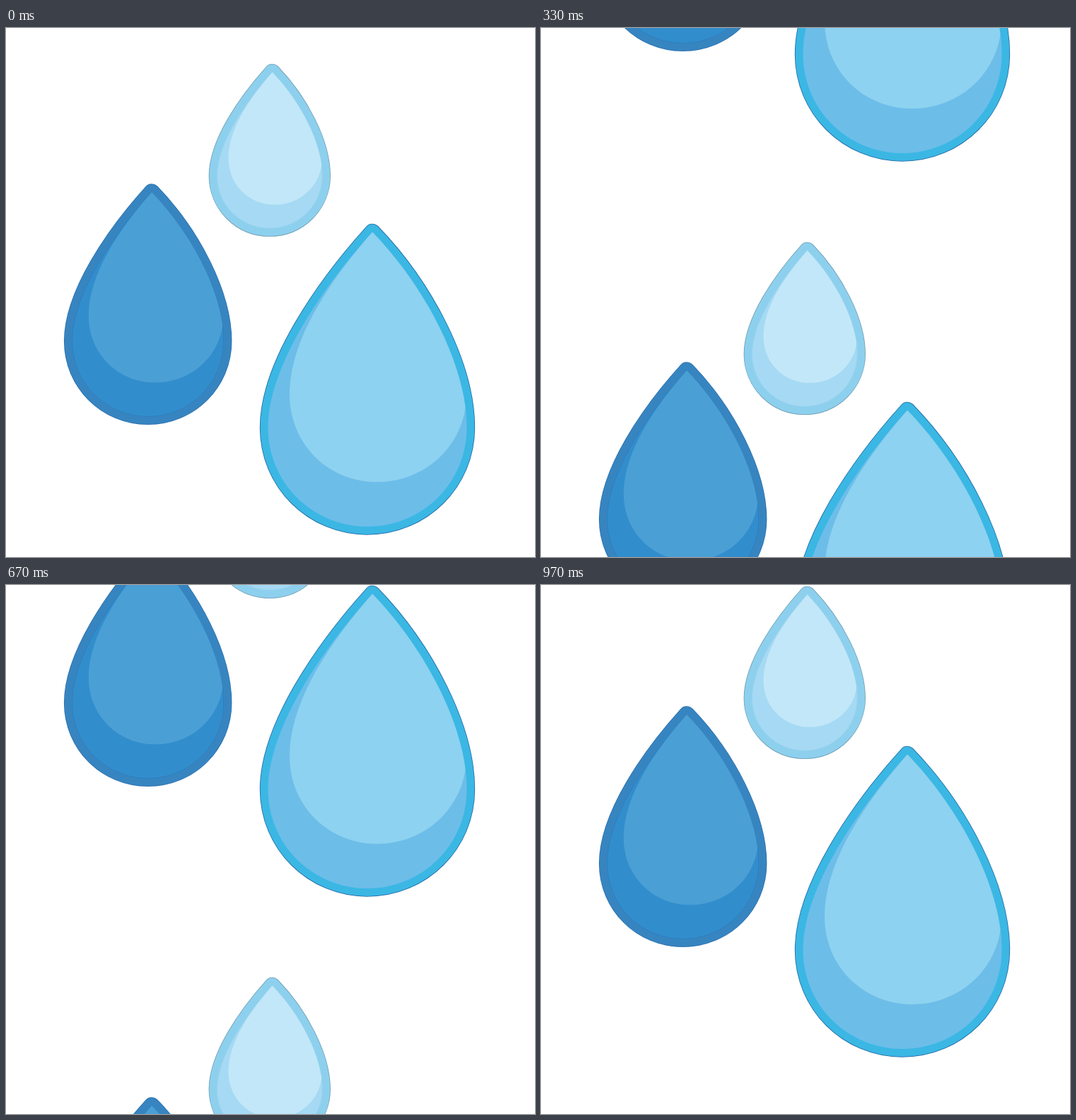
These frames come from a looping animation (748 by 748 pixels, 1010 ms). An HTML page:

```html
<!DOCTYPE html>
<html lang="en">
<head>
<meta charset="utf-8">
<title>Falling drops</title>
<style>
  html, body { margin: 0; height: 100%; overflow: hidden; background: #fff; }
  svg { display: block; width: 100%; height: 100%; }
  path { vector-effect: non-scaling-stroke; stroke-linejoin: round; }
  .edge { fill: none; stroke: var(--edge); stroke-width: 23.4px; }
  .rim { fill: none; stroke: var(--rim); stroke-width: 21.8px; }
  .body { fill: var(--body); stroke: var(--seam); stroke-width: 1px; }
  .shine { fill: var(--shine); }
  .pale { --edge: #6f9db3; --rim: #8dd0ee; --body: #a6d9f3; --seam: #98d2ee; --shine: #c2e7f8; }
  .deep { --edge: #2a6fae; --rim: #3785c0; --body: #328dcc; --seam: #2f7fbd; --shine: #4a9fd5; }
  .clear { --edge: #2068a4; --rim: #3bb7e4; --body: #6dbde9; --seam: none; --shine: #8dd2f0; }
</style>
</head>
<body>
<svg viewBox="0 0 748 748">
  <defs>
    <path id="outline" d="M0 0C75 77.5 133.5 189.5 133.5 276.5C133.5 354.2 71 416.5 -7 416.5C-85 416.5 -147.5 354.2 -147.5 276.5C-147.5 189.5 -70 77.5 0 0Z"/>
    <clipPath id="inside"><use href="#outline"/></clipPath>
    <g id="drop">
      <use href="#outline" class="edge"/>
      <use href="#outline" class="rim"/>
      <use href="#outline" class="body"/>
      <path class="shine" clip-path="url(#inside)" d="M0 0C-66 75.5 -117 156.5 -117 229.5C-117 299.5 -62.5 353.5 7 353.5C76.5 353.5 133 299.5 133 229.5L140 0Z"/>
    </g>
    <g id="trio">
      <use href="#drop" class="pale" transform="translate(376.5 62.5) scale(.53)"/>
      <use href="#drop" class="deep" transform="translate(206 232) scale(.762)"/>
      <use href="#drop" class="clear" transform="translate(518 288.5)"/>
    </g>
  </defs>
  <g id="rain">
    <use href="#trio"/>
    <use href="#trio" y="-780"/>
  </g>
</svg>
<script>
  const LOOP = 1010, STEP = 25.2, LAST = 29;
  const rain = document.getElementById('rain');

  // 30 steps per second, with each change rounded to 10 ms
  function stepAt(ms) {
    const tick = Math.floor((ms % LOOP) / 10);
    return Math.min(LAST, Math.floor((3 * tick + 1) / 10));
  }

  function draw() {
    const y = Math.round(stepAt(performance.now()) * STEP);
    rain.setAttribute('transform', `translate(0 ${y})`);
    requestAnimationFrame(draw);
  }
  draw();
</script>
</body>
</html>
```
